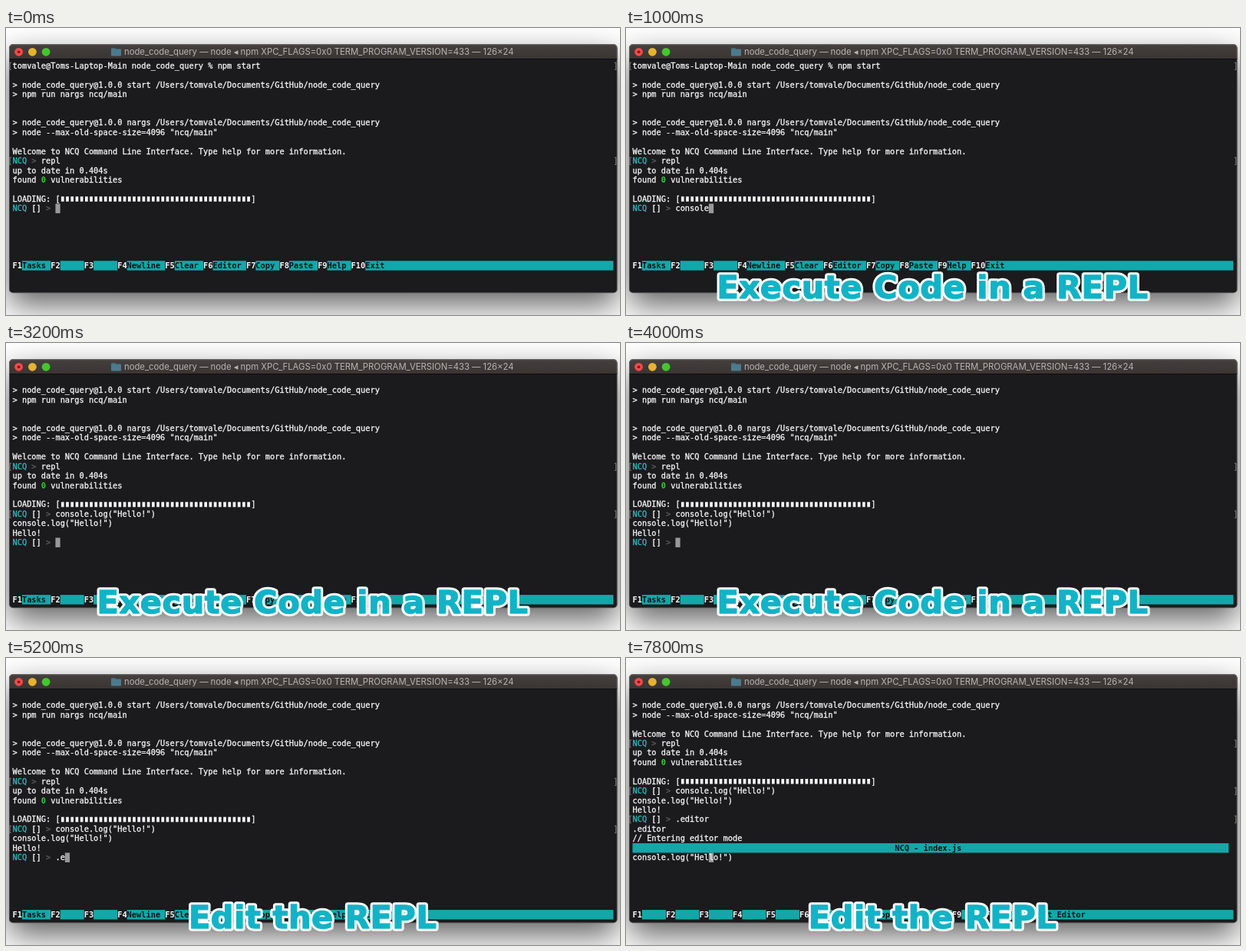
Animation, 800 px wide and 375 px high, one loop 8000 ms. Source, as an HTML page with a canvas:

```html
<!DOCTYPE html>
<html lang="en">
<head>
<meta charset="utf-8">
<title>REPL demo</title>
<style>
  html, body { margin: 0; width: 100%; height: 100%; overflow: hidden; background: #fff; }
  canvas { display: block; }
</style>
</head>
<body>
<canvas id="stage" width="800" height="375"></canvas>
<script>
const ctx = document.getElementById('stage').getContext('2d');
const LOOP = 8000, STEP = 200;
const LEFT = 8.5, TOP = 43, CELL = 6.213, ROW = 12.44, COLS = 126;
const MONO = '10.32px "DejaVu Sans Mono", monospace';
const WHITE = '#f6f6f6', TEAL = '#12a8a9', CYAN = '#35b5bd', DIM = '#5c5c5c', GREEN = '#35c93f';
const CODE = 'console.log("Hello!")', EDIT = '.editor';

// Key times in ms
const TYPE_CODE = 300, KEY = 115, ENTER_CODE = 3000;
const TYPE_EDIT = 5050, ENTER_EDIT = 5900, MOVE_CURSOR = 6000, MOVE_KEY = 110;

// A line is a list of [text, color, bold]; "marked" lines carry side brackets.
const line = (...parts) => ({ parts });
const plain = text => line([text, WHITE]);
const mark = l => ({ ...l, marked: true });
const prompt = text => line(['NCQ ', CYAN], ['[]', WHITE, true], [' > ', DIM], [text, WHITE]);
const blank = plain('');
const path = '/Users/tomvale/Documents/GitHub/node_code_query';

const intro = [
  mark(plain('tomvale@Toms-Laptop-Main node_code_query % npm start')),
  blank,
  plain('> node_code_query@1.0.0 start ' + path),
  plain('> npm run nargs ncq/main'),
  blank,
  blank,
  plain('> node_code_query@1.0.0 nargs ' + path),
  plain('> node --max-old-space-size=4096 "ncq/main"'),
  blank,
  plain('Welcome to NCQ Command Line Interface. Type help for more information.'),
  mark(line(['NCQ', CYAN], [' > ', DIM], ['repl', WHITE])),
  plain('up to date in 0.404s'),
  line(['found ', WHITE], ['0', GREEN, true], [' vulnerabilities', WHITE]),
  blank,
  { ...plain('LOADING: [' + ' '.repeat(40) + ']'), progress: true }
];
const afterCode = [...intro, mark(prompt(CODE)), plain(CODE), plain('Hello!')];
const afterEdit = [...afterCode, mark(prompt(EDIT)), plain(EDIT),
  plain('// Entering editor mode'), { parts: [], header: true }, plain(CODE)];

const gap = ' '.repeat(5);
const replKeys = ['Tasks ', gap, gap, 'Newline ', 'Clear ', 'Editor ', 'Copy ', 'Paste ', 'Help ', 'Exit'];
const editorKeys = [gap, gap, gap, gap, gap, gap, gap, 'Copy'.padEnd(16), gap, 'Exit Editor'.padStart(18)];

const clamp = v => Math.max(0, Math.min(1, v));
const colX = col => LEFT + col * CELL;
const rowY = row => TOP + row * ROW;

function fillCells(col, row, count, color) {
  ctx.fillStyle = color;
  ctx.fillRect(colX(col), rowY(row), count * CELL, ROW);
}

function write(text, col, row, color, bold) {
  ctx.font = (bold ? 'bold ' : '') + MONO;
  ctx.fillStyle = ctx.strokeStyle = color;
  ctx.lineWidth = 0.3;
  [...text].forEach((ch, i) => {
    if (ch === ' ') return;
    const at = [ch, colX(col + i), rowY(row) + 9.75];
    ctx.fillText(...at);
    if (!bold) ctx.strokeText(...at);
  });
  return col + text.length;
}

function drawLine(l, row) {
  let col = 0;
  for (const [text, color, bold] of l.parts) col = write(text, col, row, color, bold);
  if (l.marked) {
    write('[', -1, row, '#777');
    write(']', COLS, row, '#777');
  }
  if (l.progress) {
    ctx.fillStyle = WHITE;
    for (let i = 10; i < 50; i++) ctx.fillRect(colX(i) + 1.3, rowY(row) + 3, 3.7, 6.6);
  }
  if (l.header) {
    fillCells(0, row, COLS - 1, TEAL);
    write('NCQ - index.js', 55, row, '#0b1414', true);
  }
}

function drawKeys(labels, row) {
  let col = 0;
  labels.forEach((label, i) => {
    col = write('F' + (i + 1), col, row, WHITE, true);
    const last = i === labels.length - 1;
    fillCells(col, row, last ? COLS - col : label.length, TEAL);
    col = write(label, col, row, '#0b1414', true);
  });
}

function drawCursor(col, row, under) {
  fillCells(col, row, 1, '#999');
  if (under) write(under, col, row, WHITE);
}

function roundRect(x, y, w, h, r) {
  ctx.beginPath();
  ctx.roundRect(x, y, w, h, r);
}

function drawWindow() {
  ctx.fillStyle = '#fff';
  ctx.fillRect(0, 0, 800, 375);

  ctx.save();
  ctx.shadowColor = 'rgba(0,0,0,.62)';
  ctx.shadowBlur = 40;
  ctx.shadowOffsetY = 16;
  ctx.fillStyle = '#1b1a1c';
  roundRect(4, 21.3, 792.5, 325, 5);
  ctx.fill();
  ctx.restore();

  const bar = ctx.createLinearGradient(0, 21, 0, 40);
  bar.addColorStop(0, '#45403d');
  bar.addColorStop(1, '#3a3533');
  ctx.fillStyle = bar;
  roundRect(4, 21.3, 792.5, 18.7, [5, 5, 0, 0]);
  ctx.fill();
  ctx.fillStyle = '#0d0c0d';
  ctx.fillRect(4, 40, 792.5, 1);
  ctx.strokeStyle = 'rgba(255,255,255,.2)';
  ctx.lineWidth = 1;
  roundRect(4.5, 21.8, 791.5, 324, 4.5);
  ctx.stroke();

  const dot = (x, r, color) => {
    ctx.fillStyle = color;
    ctx.beginPath();
    ctx.arc(x, 31.3, r, 0, 2 * Math.PI);
    ctx.fill();
  };
  dot(16.6, 5.4, '#f8484a');
  dot(16.6, 1.8, '#7c1410');
  dot(34.4, 5.4, '#e6b32e');
  dot(52.1, 5.4, '#43c72c');

  ctx.fillStyle = '#426a7b';
  roundRect(137, 26, 6, 4, 1);
  ctx.fill();
  ctx.fillStyle = '#4c7a8d';
  roundRect(137, 27.5, 13, 9, 1);
  ctx.fill();

  ctx.font = '11.31px Inter, "DejaVu Sans", sans-serif';
  ctx.fillStyle = '#b8b4b2';
  ctx.fillText('node_code_query — node ◂ npm XPC_FLAGS=0x0 TERM_PROGRAM_VERSION=433 — 126×24', 154, 35.4);
}

function drawCaption(text, t, start, end) {
  const shown = clamp((t - start) / 330) * clamp((end - t) / 200);
  if (!shown) return;
  const settle = Math.max(0, 1 - (t - start) / 600);
  ctx.save();
  ctx.globalAlpha = shown;
  ctx.translate(399.5 + 2 * settle, 352.7 + 2 * settle);
  ctx.font = 'bold 41.5px "DejaVu Sans", Verdana, sans-serif';
  ctx.letterSpacing = '0.6px';
  ctx.textAlign = 'center';
  ctx.lineJoin = 'round';
  const outline = (width, color) => {
    ctx.lineWidth = width;
    ctx.strokeStyle = color;
    ctx.strokeText(text, 0, 0);
  };
  outline(7.5, '#fff');
  outline(1.4, '#12b3c6');
  ctx.fillStyle = '#12b3c6';
  ctx.fillText(text, 0, 0);
  ctx.restore();
}

const typed = (text, t, start) => text.slice(0, Math.max(0, Math.floor((t - start) / KEY) + 1));

function drawTerminal(t) {
  let lines, scroll, input = '';
  const editing = t >= ENTER_EDIT;
  if (editing) {
    lines = afterEdit;
    scroll = 5;
  } else {
    const ran = t >= ENTER_CODE;
    input = ran ? typed(EDIT, t, TYPE_EDIT) : typed(CODE, t, TYPE_CODE);
    lines = [...(ran ? afterCode : intro), prompt(input)];
    scroll = ran ? 1 : 0;
  }
  lines.slice(scroll).forEach(drawLine);

  const row = lines.length - 1 - scroll;
  if (editing) {
    const col = Math.min(16, Math.max(0, Math.floor((t - MOVE_CURSOR) / MOVE_KEY)));
    drawCursor(col, row, CODE[col]);
  } else {
    drawCursor(9 + input.length, row);
  }
  drawKeys(editing ? editorKeys : replKeys, scroll ? 23 : 21);
}

function frame(now) {
  const t = Math.floor((now % LOOP) / STEP) * STEP;
  drawWindow();
  drawTerminal(t);
  drawCaption('Execute Code in a REPL', t, 100, 4700);
  drawCaption('Edit the REPL', t, 4650, Infinity);
  requestAnimationFrame(frame);
}
requestAnimationFrame(frame);
</script>
</body>
</html>
```
